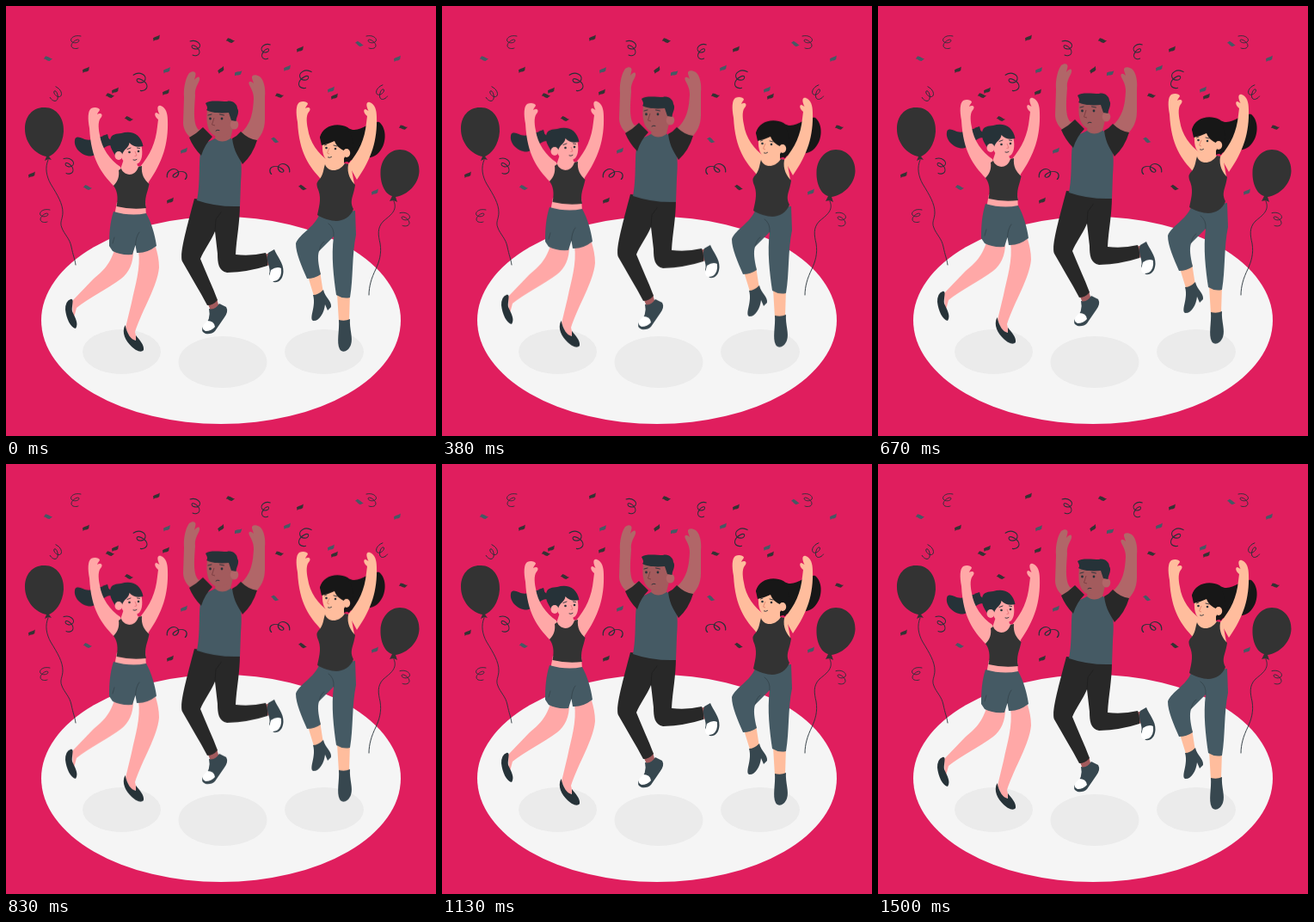
Animation, 500 px wide and 500 px high, one loop 1.54 s. Source, as an HTML page without scripts:

```html
<!DOCTYPE html>
<html lang="en">
<head>
<meta charset="utf-8">
<title>Party jump</title>
<style>
html, body { margin: 0; width: 100%; height: 100%; overflow: hidden; background: #e01e5e; }
svg { display: block; width: 100%; height: 100%; }
.jump { animation: jump 1540ms linear infinite; }
@keyframes jump {
  0%, 97%, 100% { transform: translateY(0); }
  45% { transform: translateY(-9.4px); }
  50% { transform: translateY(-10px); }
}
.line { fill: none; stroke: #263238; stroke-width: .9; stroke-linecap: round; stroke-linejoin: round; }
.slate { fill: #455a64; }
.deep { fill: #37474f; }
.ink { fill: #263238; }
.black { fill: #282828; }
.top { fill: #333; }
.hair { fill: #171717; }
.rose { fill: #ffa8a7; }
.peach { fill: #ffbd9d; }
.brown { fill: #b16668; }
.tan { fill: #a35b5d; }
.fold { fill: none; stroke: #000; stroke-opacity: .25; stroke-width: .8; stroke-linecap: round; }
</style>
</head>
<body>
<svg viewBox="0 0 500 500">
  <defs>
    <path id="bit" d="M-4 .2Q-1.500-1.500 .5-1.800T3.800-3.400L3.200 1Q1 2.600-.6 2.600T-3.400 4Z"/>
    <path id="curl" class="line" d="M6-7C-2-9-7-4-5-1C-3 2 4 1 4-2C3-5-5 0-5 4C-5 8 1 8 3 7"/>
    <path id="armL" d="M97 142C95 131 95 122 99 119C103 117 108 118 109 120.500C109 122 107 123 106 126C109 124 113 125 111 129C107 133 107 140 109 150C111 165 121 179 133 187L136 206L125 209C111 194 99 179 97 142Z"/>
    <path id="armR" d="M176 140L177 132C173 129 172 124 175 124L178.500 126C175 119 176 115 180 116C186 118 188 125 188 133C189 160 182 182 165 206L155 188C168 173 174 159 176 140Z"/>
  </defs>

  <rect width="500" height="500" fill="#e01e5e"/>
  <ellipse cx="250" cy="365.500" rx="209" ry="120.500" fill="#f5f5f5"/>
  <g fill="#ebebeb">
    <ellipse cx="134.500" cy="402" rx="45.500" ry="26"/>
    <ellipse cx="252" cy="414" rx="51.500" ry="30"/>
    <ellipse cx="370" cy="402" rx="46" ry="26"/>
  </g>

  <!-- balloons -->
  <g fill="#333">
    <path d="M44 118C58 117 68 130 67 146C66 162 57 172 50 175L53 179Q49 177 45 180L47 175C35 173 22 160 22 143C22 128 31 118 44 118Z"/>
    <path d="M458 167C471 167 481 178 480.500 192C480 207 467 220 453 222L455 228Q451 225 446 227L449 221C441 219 435 207 435.500 193C436 178 446 167 458 167Z"/>
  </g>
  <path class="line" d="M49 179C45 188 47 198 52 207C60 220 66 230 66 240C66 248 62 251 65 258C68 266 74 270 76 280C78 290 80 294 81 301"/>
  <path class="line" d="M451 227C456 238 446 244 439 250C431 258 433 267 435 276C437 288 434 297 430 306C425 316 422 326 422 336"/>

  <!-- confetti -->
  <g class="slate">
    <use href="#bit" transform="translate(49 61) rotate(45)"/>
    <use href="#bit" x="187" y="74.500"/>
    <use href="#bit" x="207" y="168"/>
    <use href="#bit" transform="translate(95 211) rotate(50)"/>
    <use href="#bit" transform="translate(270 78) rotate(10)"/>
    <use href="#bit" x="327" y="72"/>
    <use href="#bit" transform="translate(313 156) rotate(65)"/>
    <use href="#bit" x="378" y="97"/>
    <use href="#bit" transform="translate(411 44) rotate(60)"/>
    <use href="#bit" x="455" y="61"/>
    <use href="#bit" x="429" y="216"/>
  </g>
  <g fill="#333">
    <use href="#bit" x="93" y="74"/>
    <use href="#bit" x="175" y="37"/>
    <use href="#bit" x="186" y="100"/>
    <use href="#bit" x="127" y="98"/>
    <use href="#bit" transform="translate(121 104) rotate(45)"/>
    <use href="#bit" transform="translate(143 131) rotate(50)"/>
    <use href="#bit" x="30" y="196"/>
    <use href="#bit" x="191" y="226"/>
    <use href="#bit" transform="translate(250 74) rotate(-15)"/>
    <use href="#bit" transform="translate(261 40) rotate(45)"/>
    <use href="#bit" x="342" y="50"/>
    <use href="#bit" transform="translate(318 104) rotate(40)"/>
    <use href="#bit" transform="translate(345 211) rotate(60)"/>
    <use href="#bit" x="382" y="105"/>
    <use href="#bit" transform="translate(462 141) rotate(40)"/>
  </g>
  <use href="#curl" x="81" y="42"/>
  <use href="#curl" transform="translate(58 103) rotate(40) scale(-1 1)"/>
  <use href="#curl" transform="translate(157 88) rotate(-15) scale(-1.100 1.400)"/>
  <use href="#curl" transform="translate(73 186) scale(-1 1.200)"/>
  <use href="#curl" x="45" y="244"/>
  <use href="#curl" transform="translate(220 49) scale(-1 1.150)"/>
  <use href="#curl" transform="translate(302 53) scale(.9 1.150)"/>
  <use href="#curl" transform="translate(347 85) rotate(10) scale(1.100 1.400)"/>
  <use href="#curl" transform="translate(318 190) rotate(75) scale(1 1.500)"/>
  <use href="#curl" transform="translate(199 196) rotate(-75) scale(-1 1.500)"/>
  <use href="#curl" transform="translate(425 42) scale(-1 1)"/>
  <use href="#curl" transform="translate(437 101) rotate(-35)"/>
  <use href="#curl" transform="translate(464 248) scale(-1 1.050)"/>

  <!-- woman in shorts -->
  <g class="jump">
    <path class="ink" d="M123 157C115 149 108 152 100 155C91 158 85 149 80.500 154C77 164 88 175 99 174.500C110 173 113 161 123 162Z"/>
    <path class="ink" d="M112 151L118 149L120 156L116 160Z"/>
    <g class="rose">
      <use href="#armL"/>
      <use href="#armR"/>
      <path d="M126 284C120 303 110 310 101 318L77 343L78 366L82 351C96 340 119 328 134 317C143 310 148 299 148 285Z"/>
      <path d="M154 284C157 305 150 325 146 345L139 374L146 390L152 388L150 379C159 352 176 326 178 304C178 295 176 287 174 280Z"/>
      <path d="M133 190L137 178H151L153 186L160 188L166 207L125 209Z"/>
      <path d="M129 228H162L163 244H126Z"/>
    </g>
    <path class="slate" d="M125 239Q145 245 163 241C169 252 173 265 175 279Q163 288 152 287L150.500 278L147 289Q133 290 124 285L120 279C120 264 121 251 125 239Z"/>
    <path class="fold" d="M150.500 278Q151 268 155 263M124 276L126 269"/>
    <path class="top" d="M134 189C136 196 149 201 154 187L158 186C157 196 161 202 166.500 207C165 216 160 224 163 235Q145 237 128.500 233C131 222 129 214 125 209C130 204 132 198 131 191Z"/>
    <path class="rose" d="M134 158C139 153 152 153 157 160C159 169 159 177 155 182C149 187 138 183 135 178Z"/>
    <path class="ink" d="M121 156C122 148 129 149 134 148C146 144 157 149 159.500 163C153 165 147 163 143.500 159C143 165 137 166 135 173L128 176C125 169 120 165 121 156Z"/>
    <ellipse class="rose" cx="131" cy="174" rx="4.500" ry="5"/>
    <g class="ink">
      <circle cx="143.500" cy="170" r="1.300"/>
      <circle cx="154" cy="169" r="1.300"/>
    </g>
    <path class="line" d="M141 166.500L145 165M152.500 165L155.500 165.500M148 179Q150 180 152 178.500"/>
    <path fill="none" stroke="#e97c80" d="M150 169L152 174L149.500 174.500"/>
    <path class="ink" d="M75 341C80 339 76 349 77 355C80 362 85 369 81 375C75 374 70 363 69 353Q69 343 75 341Z"/>
    <path class="ink" d="M138.500 371C141 381 145 388 151 389L151 383C155 388 161 394 160 400C157 404 150 400 146 396C139 389 134 380 138.500 371Z"/>
  </g>

  <!-- man -->
  <g class="jump">
    <g class="brown">
      <path d="M207 106C206 96 209 83 213 78C217 75 221 76 220.500 80L219 86C222 82 226 81 225 86C223 92 219 96 220 104C219 120 217 137 224 144L230 142L218 156C210 150 206 143 206 136Z"/>
      <path d="M301 106C302 96 300 86 295 82C290 79 285 80 286 84L288 90C284 86 281 88 283 92C286 98 288 101 288 108C287 125 285 137 272 149L288 160C297 152 301 143 301 132Z"/>
    </g>
    <path class="tan" d="M234 345L245 340L248 351L238 354ZM300 289L308 287L309 301L302 302Z"/>
    <path class="black" d="M219 224L272 230C272 252 268 270 267 289Q285 291 302 287Q305 294 304 302Q283 309 257 310C247 308 246 299 246 288L243 262C238 274 230 284 226 294C232 309 240 326 246 342Q241 348 234 348C225 331 214 313 205 297C201 289 211 255 219 224Z"/>
    <path class="fold" d="M243 262L244 248L250 240"/>
    <path class="slate" d="M229 160Q238 157 243 154L260 153L268 158C275 176 274 190 273 205L272 233Q245 234 222 226C226 207 224 183 226 171Z"/>
    <path class="black" d="M229 141L240 152Q231 161 227 174Q218 165 213 153Q222 148 229 141ZM263 154Q269 151 273 146Q282 155 292 156Q287 173 275 184C271 176 265 170 263 154Z"/>
    <path class="tan" d="M244 147L264 142L261 154Q251 161 243 154Z"/>
    <path class="tan" d="M234 121Q247 113 264 122L265 140C262 148 253 153 245 151.500C235 149 232 137 234 121Z"/>
    <ellipse class="brown" cx="265.500" cy="138" rx="4.800" ry="5.500"/>
    <path class="ink" d="M232 113C237 109 249 111 257 111C263 109 269 114 269 119C272 124 268 128 267.500 134L262 133L259 124C248 125 238 124 233 121C235 119 234 117 232 113Z"/>
    <g class="ink">
      <circle cx="237.500" cy="131" r="1.400"/>
      <circle cx="251" cy="131" r="1.400"/>
    </g>
    <path class="line" d="M235 127L239 126M248.500 126L253.500 127M244 145Q246 143.500 248 144.500"/>
    <path fill="none" stroke="#7f4044" d="M242 130L239.500 138L243 139"/>
    <path class="deep" d="M236 352Q243 354 248 346L256 350Q259 355 254 362L243 378Q239 382 232 381Q226 378 229 373Q239 365 236 352Z"/>
    <path fill="#fff" d="M234 366Q242 366 243 373Q239 378 232 378Q227 376 229.500 371Z"/>
    <path class="deep" d="M305 287L312 283C315 291 323 299 322.500 309C322 318 317 322 311 321L306 312C309 304 301 297 305 287Z"/>
    <path fill="#fff" d="M308 307Q315 302 320 305Q321 315 315 319Q306 322 306 315Z"/>
  </g>

  <!-- woman in tank top -->
  <g class="jump">
    <path class="hair" d="M365 153C368 139 385 135 397 141C409 151 423 133 434 135C443 142 443 161 433 171C423 181 409 174 403 179L386 184Z"/>
    <g class="peach">
      <use href="#armL" x="242" y="-7"/>
      <use href="#armR" x="243" y="-4"/>
      <path d="M371 185L378 176H393V183L401 185L405 207L363 209Z"/>
      <path d="M350 311L365 308L369 334L358 337ZM385 334L400 334L399 366L387 367Z"/>
    </g>
    <path class="slate" d="M364 243C358 258 342 264 337 276C337 288 344 303 350 317Q359 317 366 312C363 300 362 291 364 285L381 268C378 291 381 315 384 336Q392 341 400 339C404 316 402 290 407 266L406 238Z"/>
    <path class="fold" d="M381 268Q382 258 375 253M364 285Q366 276 370 274"/>
    <path class="top" d="M371 184C373 192 386 195 394 183L398 184C396 195 401 203 406 208C404 222 399 226 404 236C401 245 392 250 384 250C378 250 368 247 362 243C365 230 367 222 362 211Q360 205 365 201C369 196 369 190 371 184Z"/>
    <path class="peach" d="M369 152Q382 142 393 153L396 174C391 180 381 184 374 180C367 176 367 162 369 152Z"/>
    <path class="hair" d="M365 153C369 140 391 136 400 147C405 158 405 174 399 182C394 181 393 174 394 169C389 166 384 163 382 157Q376 160 367 162Z"/>
    <ellipse class="peach" cx="396" cy="171" rx="4.200" ry="5"/>
    <g class="ink">
      <circle cx="372.500" cy="165" r="1.300"/>
      <circle cx="383" cy="166" r="1.300"/>
    </g>
    <path class="line" d="M370.500 162L373 161M381 162L385 163M374.500 176Q376.500 177 378.500 175.500"/>
    <path fill="none" stroke="#e58b74" d="M376 165L373.500 171L376 172"/>
    <path class="deep" d="M357 336Q363 336 369 330C371 339 379 343 378 350L374 354L371 347C370 357 364 367 357 366C352 363 361 349 357 336Z"/>
    <path class="deep" d="M387 365Q394 367 400 364C399 375 404 386 401 394C398 402 391 404 388 399C384 391 388 377 387 365Z"/>
  </g>
</svg>
</body>
</html>
```
